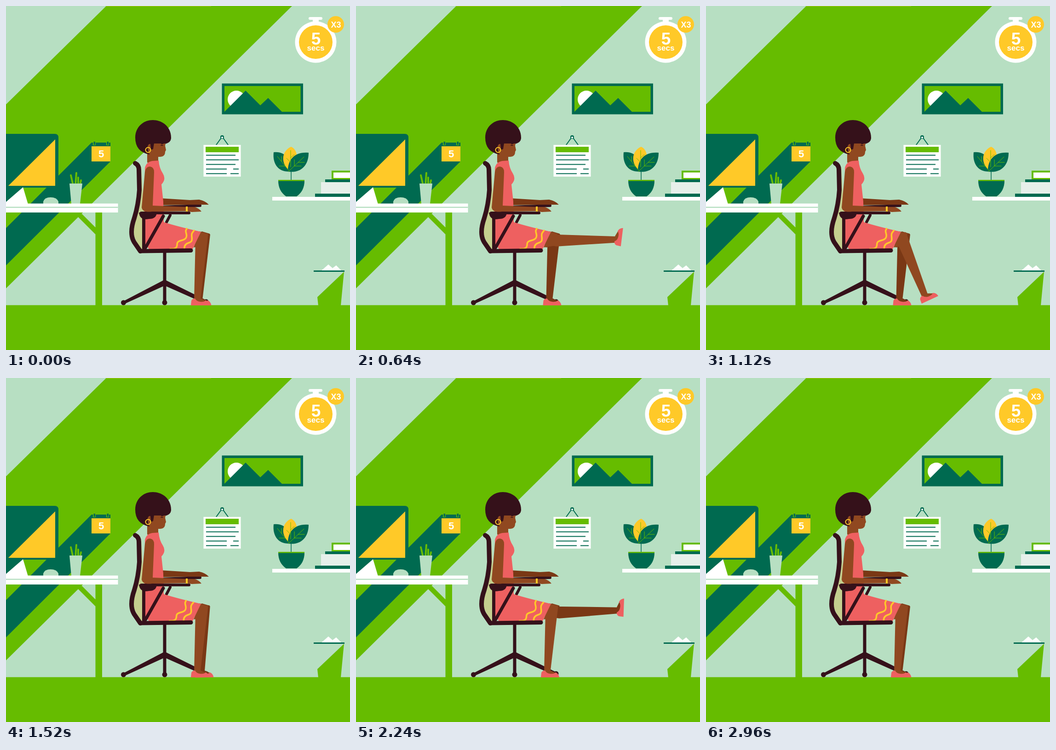
Animation of 748x748 px, one loop 3.04 s. Source, as an HTML page:

```html
<!DOCTYPE html>
<html lang="en">
<head>
<meta charset="utf-8">
<title>Seated leg raise</title>
<style>
  html, body { margin: 0; width: 100%; height: 100%; overflow: hidden; background: #b7dfc2 }
  svg { display: block; width: 100vw; height: 100vh }
  text { font: bold 18px "Liberation Sans", Arial, sans-serif; fill: #fff; text-anchor: middle }
  .green { fill: #66bc00 } .dark { fill: #006a50 } .yellow { fill: #ffc928 }
  .mint { fill: #b7dfc2 } .white { fill: #fff } .pink { fill: #ee6060 }
  .skin { fill: #904820 } .shade { fill: #7a3815 } .maroon { fill: #35111a }
  .line { fill: none; stroke-linecap: round; stroke-linejoin: round }
  .frame { stroke: #35111a }
</style>
</head>
<body>
<svg viewBox="0 0 748 748">
  <defs>
    <path id="thigh" d="M421 490L438 495L434 521L408 525Z"/>
    <path id="shin" d="M412 510Q414 495 427 495H438L439.500 497L422.500 640H409Z"/>
    <path id="instep" d="M409 636H423L434 641L430 648H407Z"/>
    <path id="shoe" class="pink" d="M402 651L403 641Q405 636 411 636Q414 642 422 643Q431 644 434 640Q441 643 442 651Z"/>
  </defs>

  <!-- wall and floor -->
  <rect class="mint" width="748" height="748"/>
  <path class="green" d="M218 0H622L0 614V214Z"/>
  <rect x="218" width="228" height="1" fill="#a8c414"/>
  <path class="dark" d="M186 297H227V338L0 564V483Z"/>
  <rect class="green" y="650.500" width="748" height="98"/>

  <!-- desk -->
  <path class="dark" d="M0 278H106Q114 278 114 286V387Q114 395 106 395H38V430H0Z"/>
  <path class="yellow" d="M107 290V391H5Z"/>
  <path class="white" d="M0 426L37 394L48 431H0Z"/>
  <path class="mint" d="M81 430V425Q84 416 97 416T114 425V430Z"/>
  <path class="line" stroke="#66bc00" stroke-width="4" d="M146 390L141 368M151 390L153 363M157 390V373M161 390L163 379"/>
  <path class="mint" d="M138 386H166L161 430H142Z"/>
  <path class="green" d="M194.500 449H209V651H194.500ZM153 455L165 452L195 482V497Z"/>
  <path class="white" d="M0 429.500H243.500V449H0Z"/>
  <path class="mint" d="M0 436.500H243.500V439H0Z"/>
  <path class="yellow" d="M186 305H227V338H186Z"/>
  <path class="green" d="M189 295H195V303H189ZM218 295H224V303H218Z"/>
  <path class="dark" d="M190.500 295H194V302H190.500ZM219.500 295H223V302H219.500Z"/>
  <text x="207" y="329" style="font-size:22px">5</text>

  <!-- picture -->
  <path class="dark" d="M469.500 168.500H646V235.500H469.500Z"/>
  <path class="green" d="M475 174H640.500V230H475Z"/>
  <circle class="white" cx="501" cy="203" r="19"/>
  <path class="dark" d="M475 230L521 184L553 216L570 200L600 230Z"/>

  <!-- notice -->
  <path class="line" stroke="#006a50" stroke-width="2" d="M457 302L470 284L483 302"/>
  <circle class="dark" cx="470" cy="285" r="4"/>
  <circle class="white" cx="470" cy="286" r="2"/>
  <path class="white" d="M429.500 302H510.500V371H429.500Z"/>
  <path class="green" d="M434 306H506V318H434Z"/>
  <path stroke="#006a50" stroke-width="2" d="M435 324.500H499M435 334.500H506M435 344.500H499M435 354.500H480M494 354.500H506M435 364.500H480M488 364.500H506"/>

  <!-- shelf -->
  <path class="white" d="M579 415H748V423H579Z"/>
  <path class="dark" d="M672 408H748V415H672ZM694 377H748V383H694Z"/>
  <path fill="#e6f0ea" d="M685 383H748V408H685Z"/>
  <path class="green" d="M708 358H748V377H708Z"/>
  <path class="white" d="M712 362H748V374H712Z"/>
  <path class="line" stroke="#006a50" stroke-width="1.500" d="M620 355V380"/>
  <path class="dark" d="M582 318C606 315 620 332 616 360C592 361 579 343 582 318Z"/>
  <path class="yellow" d="M620 306C635 312 639 340 617 358C598 345 597 316 620 306Z"/>
  <path class="dark" d="M658 319C658 348 640 364 613 360C612 334 628 316 658 319Z"/>
  <path class="line" stroke="#66bc00" d="M590 327L616 359M599 338V327M607 348H594M614 360L648 328M627 348V334M635 340H649M627 348H642M619 314V350M619 330L627 323M619 340L610 331"/>
  <path class="dark" d="M592 380H649Q649 402 632 414H609Q592 402 592 380Z"/>
  <path class="green" d="M592 378H649V380.500H592Z"/>

  <!-- bin -->
  <path class="white" d="M685 576L701 562L710 570L718 564L730 576Z"/>
  <path class="green" d="M735 578L677 633L679 651H728Z"/>
  <path class="dark" d="M669 575H736V578H669Z"/>

  <!-- stopwatch -->
  <rect class="white" x="658" y="24" width="30" height="6" rx="3"/>
  <rect class="white" x="667" y="28" width="13" height="9"/>
  <circle class="white" cx="673.500" cy="78.500" r="45"/>
  <circle class="yellow" cx="673.500" cy="78.500" r="36.500"/>
  <circle class="yellow" cx="717" cy="40" r="18"/>
  <text x="674" y="83.500" style="font-size:37px">5</text>
  <text x="673.500" y="97" style="font-size:17px">secs</text>
  <text x="717.500" y="46.500">X3</text>

  <!-- chair -->
  <path fill="#c5cf8f" d="M290 350H294L297 400L302 450V530H292L274 490L290 400Z"/>
  <path class="line frame" stroke-width="7" d="M345 535V645"/>
  <path class="maroon" d="M345 595L255 642L257 648L345 608L433 647L438 641Z"/>
  <g class="maroon">
    <circle cx="255.500" cy="645" r="5.500"/><circle cx="345" cy="645" r="5.500"/><circle cx="435" cy="643" r="5.500"/>
  </g>
  <path class="line frame" stroke-width="6" d="M340 437L422 434M357 455L349 470"/>
  <path class="shade" d="M335 418L400 422L420 421Q434 424 441 432H422L400 432L335 433Z"/>

  <!-- legs -->
  <g id="far" class="shade" transform="translate(4.500)">
    <use href="#thigh"/>
    <g><use href="#shin"/><g><use href="#instep"/><use href="#shoe"/></g></g>
  </g>
  <g id="near" class="skin">
    <use href="#thigh"/>
    <g><use href="#shin"/><g><use href="#instep"/><use href="#shoe"/></g></g>
  </g>

  <!-- body -->
  <path class="skin" d="M307 298H331V339Q320 348 307 340Z"/>
  <path class="pink" d="M302 352Q305 339 318 337L332 336Q333 352 341 364Q349 377 338 388L342 425L343 470Q375 480 424 491L405 530H312L301 515V440Z"/>
  <path id="waves" class="line" stroke="#ffc928" stroke-width="3.500" stroke-linecap="butt" d="M357 528C365 529 372 527 372 519S377 511 384 509S394 503 392 495S391 489 393 484M388 529C387 521 390 517 397 515S405 510 404 502S405 493 409 488"/>
  <path class="line frame" stroke-width="10" d="M281 342Q289 346 289 356L290 400Q288 432 279 461Q267 495 279 514L292 533"/>
  <path class="line frame" stroke-width="9" d="M293 533L402 531.500"/>
  <path class="line frame" stroke-width="7" d="M299.500 455V530M342 457L303 526"/>
  <path class="line frame" stroke-width="6" d="M294 450H398"/>
  <path class="maroon" d="M289 449H328Q327 463 311 463Q291 467 289 449Z"/>
  <path class="skin" d="M302 361Q304 349 313 349Q323 351 322 362L319 434L392 437L410 437Q420 440 425 447L404 448L393 446L318 447Q297 450 295 438Z"/>
  <path class="yellow" d="M391 436H395V447H391Z"/>

  <!-- head -->
  <path class="maroon" d="M319 248C344 248 360 267 359 288Q358 296 349 299L320 306L312 323Q281 317 281 286C281 264 298 248 319 248Z"/>
  <path class="skin" d="M321 299H347L346 304L348 313L346 317Q346 328 334 328H320Q308 325 308 306Q309 299 314 300L316 309Z"/>
  <path class="line frame" stroke-width="1.500" d="M337 303H341M338 300L342 299"/>
  <path class="maroon" d="M314 298H322L320 311L315 313Z"/>
  <circle class="line" cx="309" cy="313" r="5.500" stroke="#ffc928" stroke-width="2"/>
</svg>
<script>
  const STEP = 80, LOOP = 3040, FAR_DELAY = 18;
  const REACH = 96; // full swing of the shin, in degrees
  // Swing of shin and foot at each step of one raise.
  const shinSwing = [0, 2, 10, 24, 42, 61, 90, 94, 95, 96, 96, 96, 78, 50, 26, 12, 5, 2];
  const footSwing = [0, 1, 4, 10, 20, 34, 65, 78, 83, 86, 88, 88, 72, 43, 25, 12, 5, 2];
  const waves = document.getElementById('waves');

  function pose(id, step) {
    const shin = shinSwing[step] || 0, foot = footSwing[step] || 0;
    const leg = document.querySelector(`#${id} > g`);
    leg.setAttribute('transform', `translate(${7 * shin / REACH}) rotate(${-shin} 427 508)`);
    leg.querySelector('g').setAttribute('transform', `rotate(${shin - foot} 415 641)`);
  }

  const start = performance.now();
  function draw() {
    const step = Math.floor((performance.now() - start) % LOOP / STEP);
    pose('near', step);
    pose('far', step - FAR_DELAY);
    const shift = Math.min(1, Math.max(0, (step - 13) / 4));
    waves.setAttribute('transform', `translate(${-1.5 * shift})`);
    requestAnimationFrame(draw);
  }
  draw();
</script>
</body>
</html>
```
